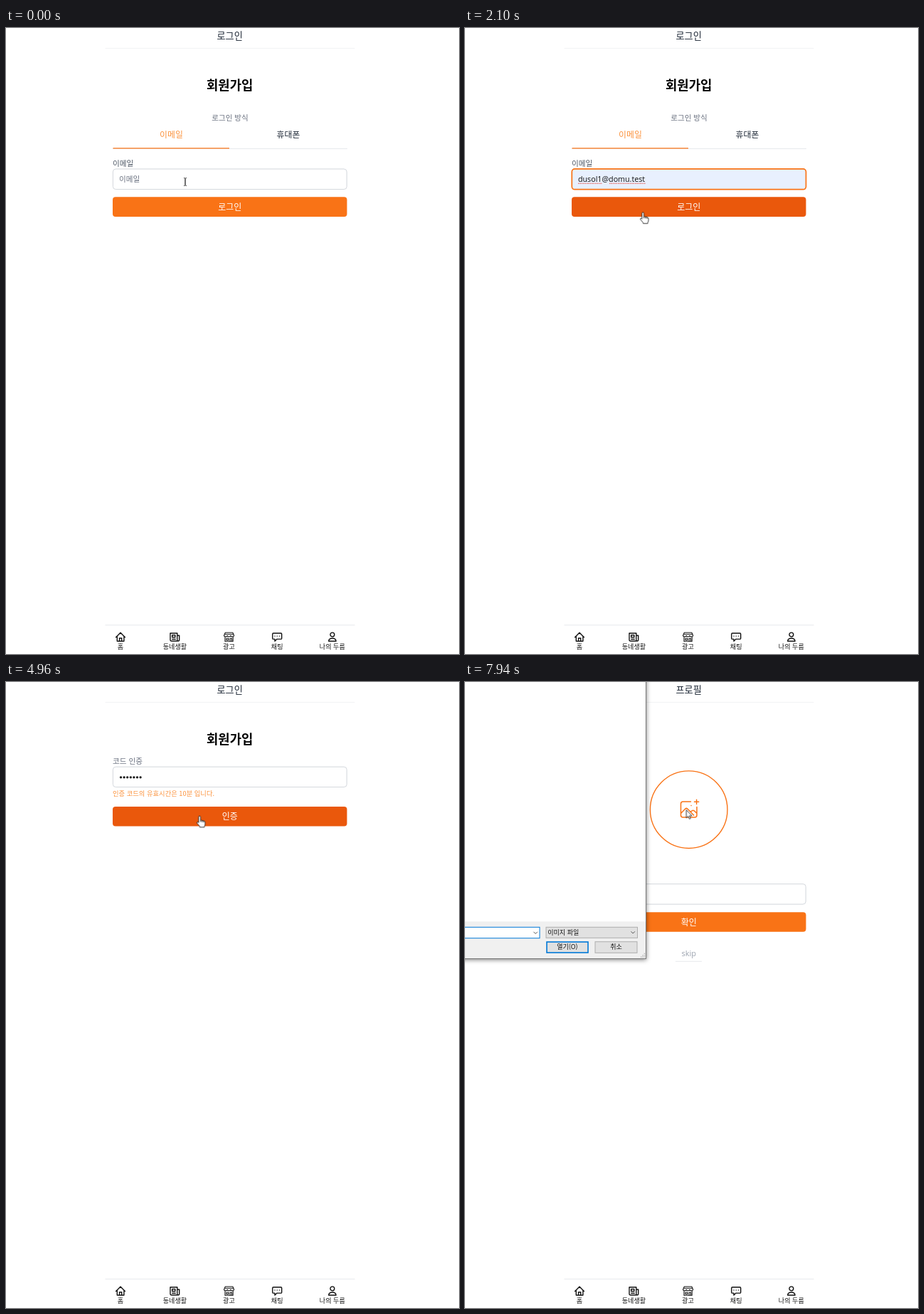
Write an HTML page that moves like this. It is 637 by 879 pixels and loops after 8000 ms.

```html
<!DOCTYPE html>
<html lang="ko">
<head>
<meta charset="utf-8">
<title>로그인</title>
<style>
html, body { margin: 0; width: 100%; height: 100%; overflow: hidden; background: #fff; }
svg { display: block; width: 637px; height: 879px; }
text { font: 10.6px 'Noto Sans CJK KR', 'Noto Sans CJK JP', 'Noto Sans CJK', sans-serif; fill: #4b5563; }
.mid { text-anchor: middle; }
.head { font-size: 13.2px; font-weight: 500; fill: #1f2937; }
.title { font-size: 17.8px; font-weight: 700; fill: #000; }
.tab { font-size: 11.9px; fill: #1f2937; }
.btn { font-size: 12px; fill: #fff; }
.hint { font-size: 9.3px; fill: #fb923c; }
.soft { fill: #6b7280; }
.nav { font-size: 9.1px; fill: #111; }
.sys { font-size: 9px; fill: #111; }
.latin { font-family: 'Open Sans', 'Noto Sans', sans-serif; font-size: 10.7px; fill: #111; }
.list text { font-size: 8.7px; fill: #3c3c3c; }
.field { fill: #fff; stroke: #d1d5db; stroke-width: .9; filter: drop-shadow(0 .7px .6px #0001); }
.ring { fill: none; stroke: #f97316; stroke-width: 1.7; }
.main { fill: #f97316; }
.line { fill: none; stroke: #e5e7eb; stroke-width: .9; }
.accent { fill: none; stroke: #f97316; stroke-width: 1.4; stroke-linecap: round; stroke-linejoin: round; }
.icon { fill: none; stroke: #111; stroke-width: 1.4; stroke-linecap: round; stroke-linejoin: round; }
.caret { stroke: #111; stroke-width: 1; }
.dots { stroke: #111; stroke-width: 3.3; stroke-linecap: round; stroke-dasharray: 0 4.6; }
.wavy { stroke: #e2473b; stroke-width: 1.1; stroke-dasharray: 1.5 .9; }
.shape { fill: #fff; stroke: #222; stroke-width: .9; stroke-linejoin: round; }

/* hard switches: percent = ms / 80 */
.k { animation: 8s step-end infinite; }
.signup { animation-name: signup; }
.email { animation-name: email; }
.code { animation-name: code; }
.profile { animation-name: profile; }
.ring1 { animation-name: ring1; }
.ring2 { animation-name: ring2; }
.caret1 { animation-name: caret1; }
.caret2 { animation-name: caret2; }
.caret3 { animation-name: caret3; }
.empty { animation-name: empty; }
.filled { animation-name: filled; }
.p1 { animation-name: p1; }
.p2 { animation-name: p2; }
.p3 { animation-name: p3; }
.chosen { animation-name: chosen; }
.blue { animation-name: blue; }
.beam { animation-name: beam; }
.arrow { animation-name: arrow; }
.hand { animation-name: hand; }
@keyframes signup { 0% { opacity: 1 } 77.75%, to { opacity: 0 } }
@keyframes email { 0% { opacity: 1 } 28.875%, to { opacity: 0 } }
@keyframes code { 0%, 77.75%, to { opacity: 0 } 28.875% { opacity: 1 } }
@keyframes profile { 0% { opacity: 0 } 77.75%, to { opacity: 1 } }
@keyframes ring1 { 0%, 27.5%, to { opacity: 0 } 1.5% { opacity: 1 } }
@keyframes ring2 { 0%, 56.1%, to { opacity: 0 } 39.125% { opacity: 1 } }
@keyframes caret1 { 0%, 7.6%, to { opacity: 0 } 1.5% { opacity: 1 } }
@keyframes caret2 { 0%, 25.25%, to { opacity: 0 } 18.625% { opacity: 1 } }
@keyframes caret3 { 0%, 45.9%, 56.1%, to { opacity: 0 } 39.125%, 47.25% { opacity: 1 } }
@keyframes empty { 0% { opacity: 1 } 9.15%, to { opacity: 0 } }
@keyframes filled { 0% { opacity: 0 } 9.15%, to { opacity: 1 } }
@keyframes p1 { 0%, 12.1%, to { opacity: 0 } 9.15% { opacity: 1 } }
@keyframes p2 { 0%, 16.125%, to { opacity: 0 } 12.1% { opacity: 1 } }
@keyframes p3 { 0% { opacity: 0 } 16.125%, to { opacity: 1 } }
@keyframes chosen { 0% { opacity: 0 } 18.625%, to { opacity: 1 } }
@keyframes blue { 0%, 81.875%, to { opacity: 0 } 77.75% { opacity: 1 } }
@keyframes beam { 0%, 37.85% { opacity: 1 } 7.45%, 42.2%, to { opacity: 0 } }
@keyframes arrow {
  0%, 24.25%, 36.3%, 37.85%, 44.57%, 54.55% { opacity: 0 }
  7.45%, 28.875%, 37.08%, 42.2%, 48.9%, 91%, to { opacity: 1 }
}
@keyframes hand {
  0%, 28.875%, 37.08%, 48.9%, 91%, to { opacity: 0 }
  24.25%, 36.3%, 44.57%, 54.55% { opacity: 1 }
}

/* smooth parts */
.list { animation: list 8s linear infinite; }
.login { animation: login 8s linear infinite; }
.verify { animation: verify 8s linear infinite; }
.typing { animation: typing 8s infinite; }
.dialog { animation: dialog 8s ease-out infinite; transform-origin: 0 150px; }
.cursor { animation: cursor 8s linear infinite; }
@keyframes list {
  0%, 1.5%, 21.2%, to { opacity: 0 }
  3.125%, 18.625% { opacity: 1 }
  19.5% { opacity: .74 }
  20.375% { opacity: .25 }
}
@keyframes login { 0%, 24.25% { fill: #f97316 } 25.5%, to { fill: #ea580c } }
@keyframes verify {
  0%, 36.3%, 38.2%, 45.875%, 50%, 54.55% { fill: #f97316 }
  37.08%, 47%, 48.9%, 55.8%, to { fill: #ea580c }
}
@keyframes typing {
  0%, 46.25% { transform: none; animation-timing-function: steps(7) }
  53.25%, to { transform: translateX(32.2px) }
}
@keyframes dialog {
  0%, 91% { opacity: 0; transform: scale(.92) }
  93.5%, to { opacity: 1; transform: none }
}
@keyframes cursor {
  0%, 5.625% { transform: translate(252px, 216px) }
  9.25% { transform: translate(252px, 237px) }
  12.25% { transform: translate(254px, 262px) }
  15.25%, 16.1% { transform: translate(255px, 284px) }
  16.125%, 19.6% { transform: translate(258px, 298px) }
  24% { transform: translate(252px, 266px) }
  26.5%, 28% { transform: translate(250px, 258px) }
  28.875% { transform: translate(250px, 259px) }
  33%, 34.625% { transform: translate(251.4px, 261px) }
  38.25%, 41% { transform: translate(252px, 134px) }
  45%, 45.875% { transform: translate(250.4px, 180.5px) }
  48.375% { transform: translate(258px, 199px) }
  51.5% { transform: translate(266px, 220px) }
  53% { transform: translate(268px, 218px) }
  56%, 81% { transform: translate(272.2px, 188.2px) }
  86.875% { transform: translate(315px, 182px) }
  93% { transform: translate(314px, 181px) }
  98.5%, 99.24% { transform: translate(310.4px, 180px) }
  99.25%, to { transform: translate(311.2px, 179.6px) }
}
</style>
</head>
<body>
<svg viewBox="0 0 637 879">
  <path class="line" d="M139.500 28.500H490.500" style="stroke:#f1f2f4"/>

  <g class="k signup">
    <text class="mid head" x="314.700" y="15.500">로그인</text>
    <text class="mid title" x="314.700" y="87.300">회원가입</text>
  </g>

  <g class="k email">
    <text class="mid soft" x="315" y="130">로그인 방식</text>
    <text class="mid tab" x="232.500" y="153.500" style="fill:#fb923c">이메일</text>
    <text class="mid tab" x="397" y="153.500">휴대폰</text>
    <path class="line" d="M150 169.500H480"/>
    <path class="accent" d="M150.500 168.900H314" style="stroke-linecap:butt"/>
    <text x="150" y="193.500">이메일</text>
    <rect class="field" x="150.400" y="198" width="328.800" height="28.500" rx="4"/>
    <rect class="k filled" x="151" y="198.500" width="328" height="27.500" rx="3.500" fill="#e8f0fe"/>
    <rect class="ring k ring1" x="150.300" y="197.900" width="329.200" height="28.800" rx="4"/>
    <text class="soft k empty" x="159" y="216">이메일</text>
    <path class="caret k caret1" d="M159.500 205V219"/>
    <text class="latin k p1" x="159" y="216">dusol12@mubo.test</text>
    <text class="latin k p2" x="159" y="216">dusol@domu.test</text>
    <text class="latin k p3" x="159" y="216">dusol1@domu.test</text>
    <path class="wavy k chosen" d="M159 218.300H193M203 218.300H254"/>
    <path class="caret k caret2" d="M254.500 205V219"/>
    <rect class="login" x="150" y="237.300" width="329.500" height="27.700" rx="4"/>
    <text class="mid btn" x="314.700" y="255.600">로그인</text>
    <g class="list">
      <rect x="219" y="232" width="138.300" height="154" rx="2" fill="#fff" style="filter:drop-shadow(0 1px 1.5px #0005)"/>
      <g fill="#e5e5e5">
        <rect class="k p1" x="219" y="236.400" width="138.300" height="24.400"/>
        <rect class="k p2" x="219" y="260.800" width="138.300" height="24.400"/>
        <rect class="k p3" x="219" y="285.200" width="138.300" height="24.400"/>
      </g>
      <text class="latin" x="227" y="251.700">dusol12@mubo.test</text>
      <text class="latin" x="227" y="276.100">dusol@domu.test</text>
      <text class="latin" x="227" y="300.500">dusol1@domu.test</text>
      <text class="latin" x="227" y="324.900">tavs@domu.test</text>
      <text class="latin" x="227" y="349.300">dusol123@mubo.test</text>
      <text class="latin" x="227" y="373.700">muhandal0736@domu.test</text>
    </g>
  </g>

  <g class="k code">
    <text class="soft" x="150" y="115">코드 인증</text>
    <rect class="field" x="150.400" y="119.200" width="328.800" height="28.300" rx="4"/>
    <path class="dots" d="M161.500 133.800h28"/>
    <g class="typing">
      <rect x="159" y="126" width="40" height="15" fill="#fff"/>
      <path class="caret k caret3" d="M159.500 126V140.500"/>
    </g>
    <rect class="ring k ring2" x="150.300" y="119" width="329.200" height="28.600" rx="4"/>
    <text class="hint" x="150" y="160">인증 코드의 유효시간은 10분 입니다.</text>
    <rect class="verify" x="150" y="175" width="329.500" height="27.600" rx="4"/>
    <text class="mid btn" x="314.700" y="193.100">인증</text>
  </g>

  <g class="k profile">
    <text class="mid head" x="314.700" y="15.500">프로필</text>
    <circle class="accent" cx="314.700" cy="179.200" r="54.300"/>
    <path class="accent" d="M317.500 168H306.500a3 3 0 0 0-3 3V187a3 3 0 0 0 3 3H323a3 3 0 0 0 3-3V175.500
      M325.600 165.200v6.200M322.500 168.300h6.200M303.800 184.300l6-6.200q1.500-1.400 3 0l8.800 9
      M317.200 182.600l2-1.800q1.500-1.200 3 0l3.600 3.500M318 173.600h.1" style="stroke-width:1.500"/>
    <text x="150" y="279.500">이름</text>
    <rect class="field" x="150.400" y="283.600" width="328.800" height="28.400" rx="4"/>
    <rect class="main" x="150" y="323.200" width="329.500" height="27.600" rx="4"/>
    <text class="mid btn" x="314.700" y="341.600">확인</text>
    <text class="mid latin" x="314.800" y="385" style="font-size:11px;fill:#9ca3af">skip</text>
    <path class="line" d="M296 392.300H333"/>
  </g>

  <path class="line" d="M139.500 838.300H490.500"/>
  <g class="icon">
    <path d="M154.600 855.500L161 849l6.400 6.500M156.300 854.500V861h9.600V854.500M159.500 861V856.800h3.200V861"/>
    <path d="M231 849.700h9.800v9.600q0 1.500 1.500 1.500H232.500q-1.500 0-1.500-1.500ZM240.800 853h2.900v6.300q0 1.500-1.400 1.500M233.700 852.500h4.200v3h-4.200ZM233.700 858.200h4.600"/>
    <path d="M308.300 849h10.600l1.800 4.200q-.6 1.800-2.400 1.600-1.800 0-2.400-1.600-.8 1.700-2.300 1.600-1.600 0-2.300-1.600-.7 1.700-2.400 1.600-1.800 0-2.400-1.600ZM308 855V861.200h11.200V855M310 857h3v2.500h-3ZM315.200 861v-4h2.300v4M308.500 851.300h10.500" style="stroke-width:1.100"/>
    <path d="M376 849.700h10.500q1.200 0 1.200 1.200v6q0 1.200-1.200 1.200H381l-3 3v-3h-2q-1.200 0-1.200-1.200v-6q0-1.200 1.200-1.200ZM378 853.900h.1M381.200 853.900h.1M384.400 853.900h.1"/>
    <path d="M461.800 851.800a2.900 2.900 0 1 1-5.800 0a2.900 2.900 0 1 1 5.800 0ZM453.700 861q.3-4 5.200-4t5.200 4Z"/>
  </g>
  <text class="mid nav" x="161" y="872">홈</text>
  <text class="mid nav" x="237.400" y="872">동네생활</text>
  <text class="mid nav" x="313.400" y="872">광고</text>
  <text class="mid nav" x="381.200" y="872">채팅</text>
  <text class="mid nav" x="458.800" y="872">나의 두름</text>

  <path class="k blue" d="M0 867.700H18.500q2.500 0 2.500 2.500V879H0Z" fill="#84a9ea"/>

  <g class="dialog">
    <rect x="-300" y="-200" width="554.500" height="588.500" fill="#fff" stroke="#777" style="filter:drop-shadow(0 1px 3px #0008)"/>
    <path d="M-300 336.300H254V388H-300Z" fill="#f0f0f0"/>
    <rect x="-200" y="344.300" width="305" height="15.400" fill="#fff" stroke="#0078d7"/>
    <rect x="114" y="344.300" width="128.500" height="15" fill="#e1e1e1" stroke="#adadad"/>
    <rect x="115" y="365" width="58" height="15" fill="#e1e1e1" stroke="#0078d7" stroke-width="1.600"/>
    <rect x="183" y="364.700" width="59" height="15.600" fill="#e1e1e1" stroke="#adadad"/>
    <path d="M96.500 350.800l2.700 2.700 2.700-2.700M233.500 350.300l2.700 2.700 2.700-2.700" fill="none" stroke="#444" stroke-width=".9"/>
    <path d="M247 386.200h6M249.400 383.800h4M251.800 381.400h2" stroke="#aaa" stroke-width="1.300" stroke-dasharray="1.300 1.100"/>
    <text class="sys" x="116.300" y="355">이미지 파일</text>
    <text class="mid sys" x="143.800" y="375.400">열기(O)</text>
    <text class="mid sys" x="212.600" y="375.400">취소</text>
  </g>

  <g class="cursor">
    <path class="k beam" d="M-2-5.500q2 0 2 1v9q0 1-2 1M2-5.500q-2 0-2 1v9q0 1 2 1" fill="none" stroke="#333" stroke-width=".9"/>
    <path class="shape k arrow" d="M0 0V11.200L2.600 8.900 4.300 12.700 6.100 11.900 4.400 8.200H7.900Z"/>
    <path class="shape k hand" d="M-1.300 1.300a1.300 1.300 0 0 1 2.600 0V5.800l4.700 1q1.800.4 1.800 2.300v2q0 2-1 3.200V15.700H.2V14.400L-3.400 10.200q-.9-1.400.3-1.900 1-.2 1.800 1ZM1.300 5.800V8.300M3.500 6.300v2.300M5.700 6.800v2.200"/>
  </g>
</svg>
</body>
</html>
```
